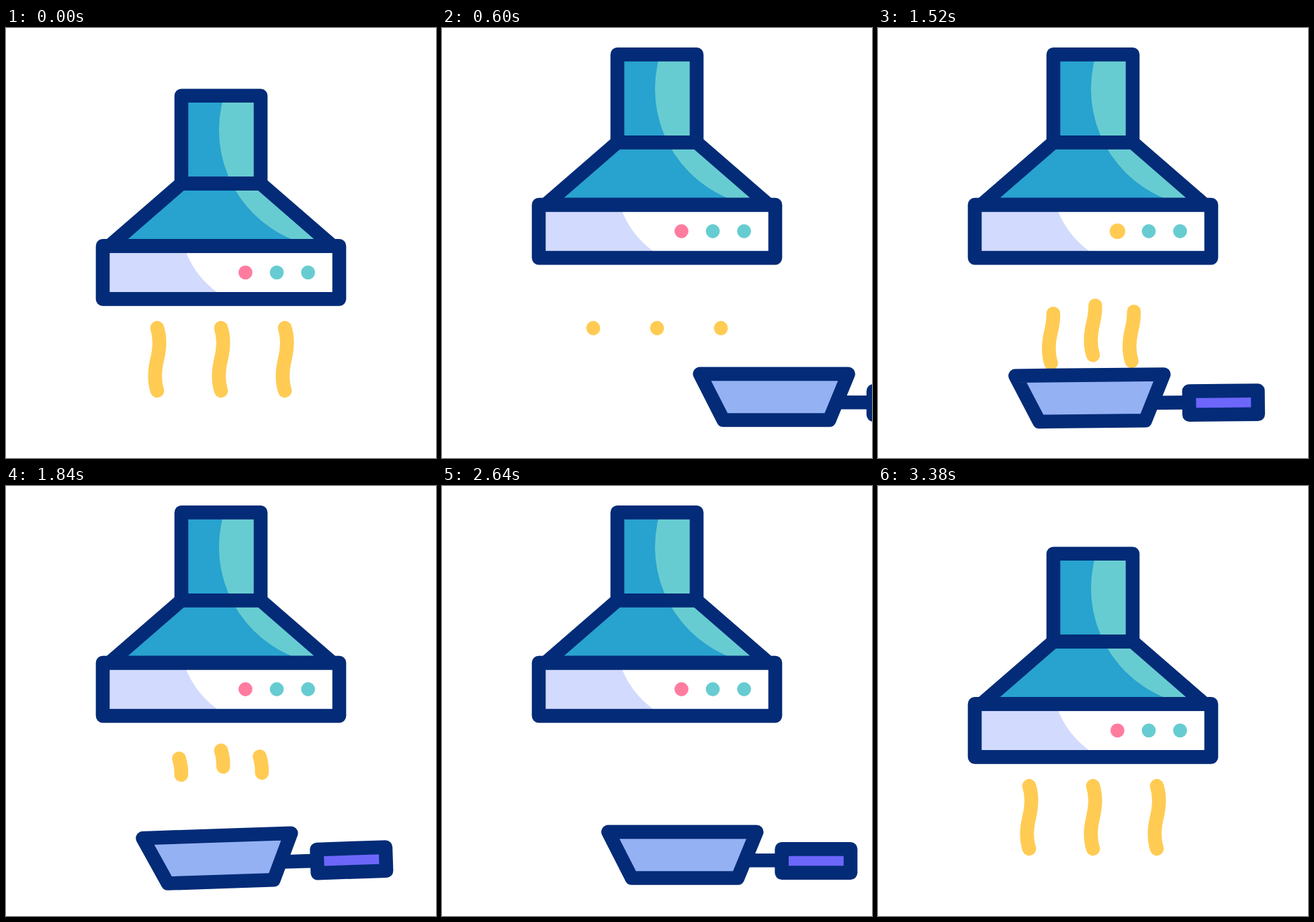
These frames come from a looping animation (640x640 px, 3.6 s). An HTML page:

```html
<!DOCTYPE html>
<html lang="en">
<head>
<meta charset="utf-8">
<title>Cooker hood</title>
<style>
  html, body { margin: 0; width: 100%; height: 100%; overflow: hidden; background: #fff; }
  svg { display: block; width: 100vw; height: 100vh; }
  .line { stroke: #032b77; stroke-width: 20.6; stroke-linejoin: round; }
  .steam { fill: none; stroke: #ffcb53; stroke-width: 20.6; stroke-linecap: round; }
</style>
</head>
<body>
<svg viewBox="0 0 640 640">
  <defs>
    <clipPath id="hoodShape">
      <path d="M261 100.5H379V231.5L486 324.5H154L261 231.5Z"/>
    </clipPath>
  </defs>
  <g id="steams"></g>
  <g id="hood">
    <g clip-path="url(#hoodShape)">
      <rect x="140" y="90" width="360" height="240" fill="#28a2cf"/>
      <circle cx="493" cy="152" r="176" fill="#67ccd1"/>
    </g>
    <rect x="144" y="324.4" width="352" height="79" fill="#d2dbfd"/>
    <path d="M268 334A136 136 0 0 0 314.5 393.5H490V334Z" fill="#fff"/>
    <g class="line" fill="none">
      <rect x="261" y="100.7" width="118" height="130.8"/>
      <path d="M261 231.5H379L486 324.4H154Z"/>
      <rect x="144" y="324.4" width="352" height="79"/>
    </g>
    <circle id="lamp" cx="356.4" cy="363.8"/>
    <circle cx="403" cy="363.8" r="10.4" fill="#67ccd1"/>
    <circle cx="449.6" cy="363.8" r="10.4" fill="#67ccd1"/>
  </g>
  <g id="pan" class="line">
    <path d="M450 557.2H500" fill="none"/>
    <path d="M246.3 514.9H467.2L439 583.5H281.3Z" fill="#94b1f3"/>
    <rect x="504.6" y="540.4" width="102.4" height="35.2" fill="#6d66fb"/>
  </g>
</svg>
<script>
const LOOP = 3600;
const REST = -41.5, TRAVEL = 460;
const el = id => document.getElementById(id);
const hood = el('hood'), pan = el('pan'), lamp = el('lamp');

// Sine ease from 0 to 1 over a time span
const ease = (t, start, length) => {
  const p = Math.min(1, Math.max(0, (t - start) / length));
  return (1 - Math.cos(Math.PI * p)) / 2;
};

const strand = ([x, y]) => {
  const path = document.createElementNS('http://www.w3.org/2000/svg', 'path');
  path.setAttribute('d', `M${x} ${y}c4.5 14 4.5 28 0 46.7c-4.5 18.7-4.5 32.7 0 46.7`);
  path.setAttribute('class', 'steam');
  path.setAttribute('pathLength', 100);
  el('steams').append(path);
  return path;
};
const hoodSteam = [[225, 446.4], [320, 446.4], [415, 446.4]].map(strand);
const panSteam = [[257.5, 405.5], [320, 393.5], [377.5, 402.5]].map(strand);

// Shows the part of each strand between two fractions, measured from the top
function trim(strands, from, to) {
  const length = (to - from) * 100;
  for (const s of strands) {
    s.style.display = length > 0.01 ? '' : 'none';
    s.setAttribute('stroke-dasharray', `${length} 300`);
    s.setAttribute('stroke-dashoffset', -from * 100);
  }
}

function draw(t) {
  const lift = ease(t, 220, 280) - ease(t, 2980, 280);
  hood.setAttribute('transform', `translate(0 ${-61.3 * lift})`);

  if (t < 1800) trim(hoodSteam, 0, 1 - ease(t, 220, 400));
  else trim(hoodSteam, 1 - ease(t, 2980, 400), 1);

  // Two puffs, each drawn upwards and then leaving at the top
  const puff = t < 1955 ? 1289 : 1955;
  trim(panSteam, 1 - ease(t, puff, 333), 1 - ease(t, puff + 333, 333));

  const x = REST + TRAVEL * (1 - ease(t, 220, 667) + ease(t, 2580, 310));
  const rocks = Math.min(3, Math.max(0, (t - 865) / 573));
  const tilt = -1.5 * (1 - Math.cos(2 * Math.PI * rocks));
  pan.setAttribute('transform', `translate(${x} 0) rotate(${tilt} 520.5 557)`);

  const lit = t < 3300 && t % 400 >= 260;
  lamp.setAttribute('fill', lit ? '#ffcb53' : '#ff7c9f');
  lamp.setAttribute('r', lit ? 11.6 : 10.4);
}

const begin = performance.now();
function tick() {
  draw((performance.now() - begin) % LOOP);
  requestAnimationFrame(tick);
}
tick();
</script>
</body>
</html>
```
